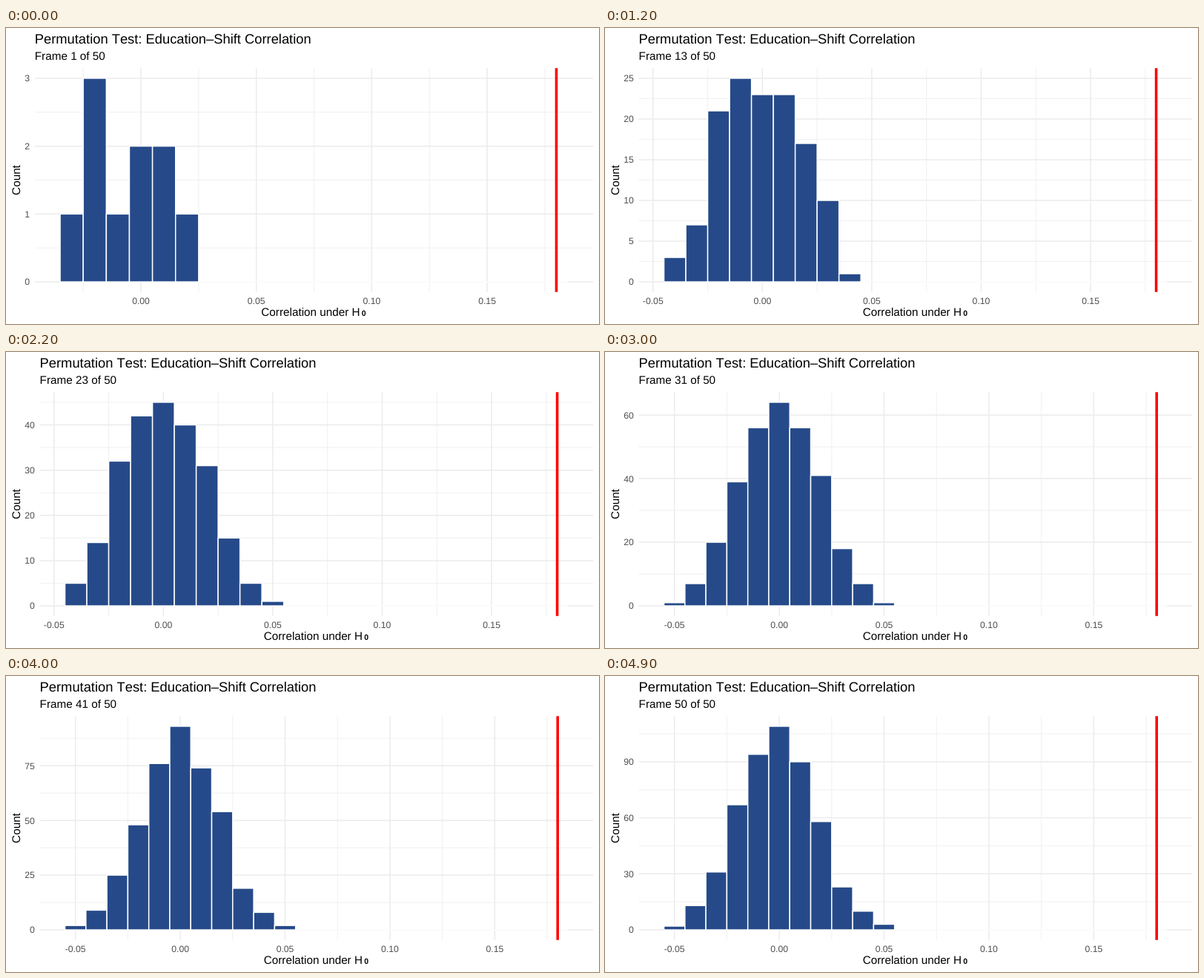
Write an HTML page that moves like this. It is 800 px wide and 400 px high and loops after 5 s.

```html
<!DOCTYPE html>
<html lang="en">
<head>
<meta charset="utf-8">
<title>Permutation Test</title>
<style>
  html, body { margin: 0; width: 100%; height: 100%; overflow: hidden; background: #fff; }
  svg { display: block; width: 800px; height: 400px; }
  text {
    font-family: "Liberation Sans", Arial, Helvetica, sans-serif;
    font-size: 15.28px; font-kerning: none; text-rendering: geometricPrecision;
  }
  .title { font-size: 18.33px; }
  .tick { font-size: 12.22px; fill: #4d4d4d; }
  .sub { font-size: 10.5px; font-weight: bold; }
  .major { stroke: #ebebeb; stroke-width: 1.48; }
  .minor { stroke: #ebebeb; stroke-width: .74; }
  .bar { fill: #264a89; stroke: #fff; stroke-width: 1.48; }
  .base { stroke: #fff; stroke-width: 1.48; }
  .mark { stroke: #f00; stroke-width: 3.56; }
</style>
</head>
<body>
<svg id="plot" viewBox="0 0 800 400"></svg>
<script>
const STEPS = 50, STEP_MS = 100, BATCH = 10;
const BIN = 0.01, FIRST_BIN = -0.05, OBSERVED = 0.18;
const TOP = 54.2, BOTTOM = 356.8, RIGHT = 792.3;

// Histogram counts (bins -0.05 to 0.05) after the given number of batches
const KEYS = [
  [1,  [0, 0, 1, 3, 1, 2, 2, 1, 0, 0, 0]],
  [8,  [0, 2, 3, 14, 17, 13, 13, 10, 8, 0, 0]],
  [19, [0, 4, 11, 29, 34, 34, 35, 26, 13, 3, 1]],
  [23, [0, 5, 14, 32, 42, 45, 40, 31, 15, 5, 1]],
  [24, [1, 5, 15, 33, 44, 47, 42, 32, 15, 5, 1]],
  [31, [1, 7, 20, 39, 56, 64, 56, 41, 18, 7, 1]],
  [41, [2, 9, 25, 48, 76, 93, 74, 54, 19, 8, 2]],
  [49, [2, 12, 30, 65, 92, 109, 88, 56, 23, 10, 3]],
  [50, [2, 13, 31, 67, 94, 109, 90, 58, 23, 10, 3]]
];

// Each batch drops its samples one by one into the bin furthest behind
function growCounts() {
  const all = [KEYS[0][1]];
  for (let n = 2; n <= STEPS; n++) {
    const k = KEYS.findIndex(key => key[0] >= n);
    const [n0, a] = KEYS[k - 1], [n1, b] = KEYS[k];
    const goal = a.map((v, i) => v + (b[i] - v) * (n - n0) / (n1 - n0));
    const now = all[n - 2].slice();
    for (let s = 0; s < BATCH; s++) {
      const lag = goal.map((g, i) => g - now[i]);
      now[lag.indexOf(Math.max(...lag))]++;
    }
    all.push(now);
  }
  return all;
}

// Axis breaks by the extended Wilkinson algorithm
function extendedBreaks(dmin, dmax, m = 5) {
  const Q = [1, 5, 2, 2.5, 4, 3], range = dmax - dmin;
  const score = (s, c, d) => 0.25 * s + 0.2 * c + 0.5 * d + 0.05;
  const tail = (0.1 * range) ** 2;
  let best = { score: -2 };
  for (let j = 1; ; j++) {
    for (let i = 0; i < Q.length; i++) {
      const q = Q[i], sMax = 2 - i / 5 - j;
      if (score(sMax, 1, 1) < best.score) return best;
      for (let k = 2; ; k++) {
        const dMax = k >= m ? 2 - (k - 1) / (m - 1) : 1;
        if (score(sMax, 1, dMax) < best.score) break;
        let z = Math.ceil(Math.log10(range / (k + 1) / j / q));
        for (; ; z++) {
          const step = j * q * 10 ** z, span = step * (k - 1);
          const cMax = span > range ? 1 - ((span - range) / 2) ** 2 / tail : 1;
          if (score(sMax, cMax, dMax) < best.score) break;
          const from = Math.floor(dmax / step) * j - (k - 1) * j;
          const to = Math.ceil(dmin / step) * j;
          for (let start = from; start <= to; start++) {
            const lo = start * step / j, hi = lo + span;
            const zero = start % j === 0 && lo <= 1e-9 && hi >= -1e-9 ? 1 : 0;
            const c = 1 - 0.5 * ((dmax - hi) ** 2 + (dmin - lo) ** 2) / tail;
            const r = 1 / step;
            const rt = (m - 1) / (Math.max(hi, dmax) - Math.min(lo, dmin));
            const total = score(1 - i / 5 - j + zero, c, 2 - Math.max(r / rt, rt / r));
            if (total > best.score) best = { score: total, lo, step, k };
          }
        }
      }
    }
  }
}

function axis(min, max) {
  const pad = (max - min) * 0.05, a = min - pad, b = max + pad;
  const { lo, step, k } = extendedBreaks(a, b);
  const inside = v => v >= a && v <= b;
  const major = [], minor = [];
  for (let i = -1; i <= k; i++) {
    const v = Math.round((lo + i * step) * 1e6) / 1e6;
    if (i >= 0 && i < k && inside(v)) major.push(v);
    if (inside(v + step / 2)) minor.push(v + step / 2);
  }
  return { a, b, major, minor };
}

const line = (cls, x1, y1, x2, y2) =>
  `<line class="${cls}" x1="${x1}" y1="${y1}" x2="${x2}" y2="${y2}"/>`;
const label = (cls, x, y, str, anchor = "start", more = "") =>
  `<text class="${cls}" x="${x}" y="${y}" text-anchor="${anchor}" ${more}>${str}</text>`;

function draw(counts, n) {
  const lowest = FIRST_BIN + counts.findIndex(c => c > 0) * BIN - BIN / 2;
  const highest = OBSERVED + BIN / 2;
  const xs = axis(lowest, highest), ys = axis(0, Math.max(...counts));

  const digits = ys.major.every(Number.isInteger) ? 0 : 1;
  const yText = ys.major.map(v => v.toFixed(digits));
  const chars = Math.max(...yText.map(s => s.length - digits * 1.5));
  const left = 32.05 + chars * 6.8 - 0.05;

  const X = v => left + (v - xs.a) / (xs.b - xs.a) * (RIGHT - left);
  const Y = v => BOTTOM - (v - ys.a) / (ys.b - ys.a) * (BOTTOM - TOP);
  const vert = (cls, v) => line(cls, X(v), TOP, X(v), BOTTOM);
  const horiz = (cls, v) => line(cls, left, Y(v), RIGHT, Y(v));

  let out = "";
  for (const kind of ["minor", "major"]) {
    out += ys[kind].map(v => horiz(kind, v)).join("");
    out += xs[kind].map(v => vert(kind, v)).join("");
  }

  out += line("base", X(lowest), Y(0), X(highest), Y(0));
  counts.forEach((c, i) => {
    if (!c) return;
    const x = X(FIRST_BIN + (i - 0.5) * BIN), w = X(BIN) - X(0);
    out += `<rect class="bar" x="${x}" y="${Y(c)}" width="${w}" height="${Y(0) - Y(c)}"/>`;
  });
  out += vert("mark", OBSERVED);

  ys.major.forEach((v, i) => out += label("tick", left - 6.8, Y(v) + 4.4, yText[i], "end"));
  xs.major.forEach(v => out += label("tick", X(v), 373, v.toFixed(2), "middle"));

  const mid = (left + RIGHT) / 2;
  out += label("name", mid - 71.2, 389, "Correlation under H");
  out += label("sub", mid + 67.2, 389, "0", "middle");
  out += label("name", 0, 0, "Count", "middle", 'transform="translate(18.8 205.5) rotate(-90)"');
  out += label("title", left, 21, "Permutation Test: Education–Shift Correlation");
  out += label("name", left, 43, `Frame ${n} of ${STEPS}`);
  return out;
}

const plot = document.getElementById("plot");
const views = growCounts().map((counts, i) => draw(counts, i + 1));
const start = performance.now();
let shown = -1;

function tick() {
  const i = Math.floor((performance.now() - start) / STEP_MS) % STEPS;
  if (i !== shown) plot.innerHTML = views[shown = i];
  requestAnimationFrame(tick);
}
tick();
</script>
</body>
</html>
```
